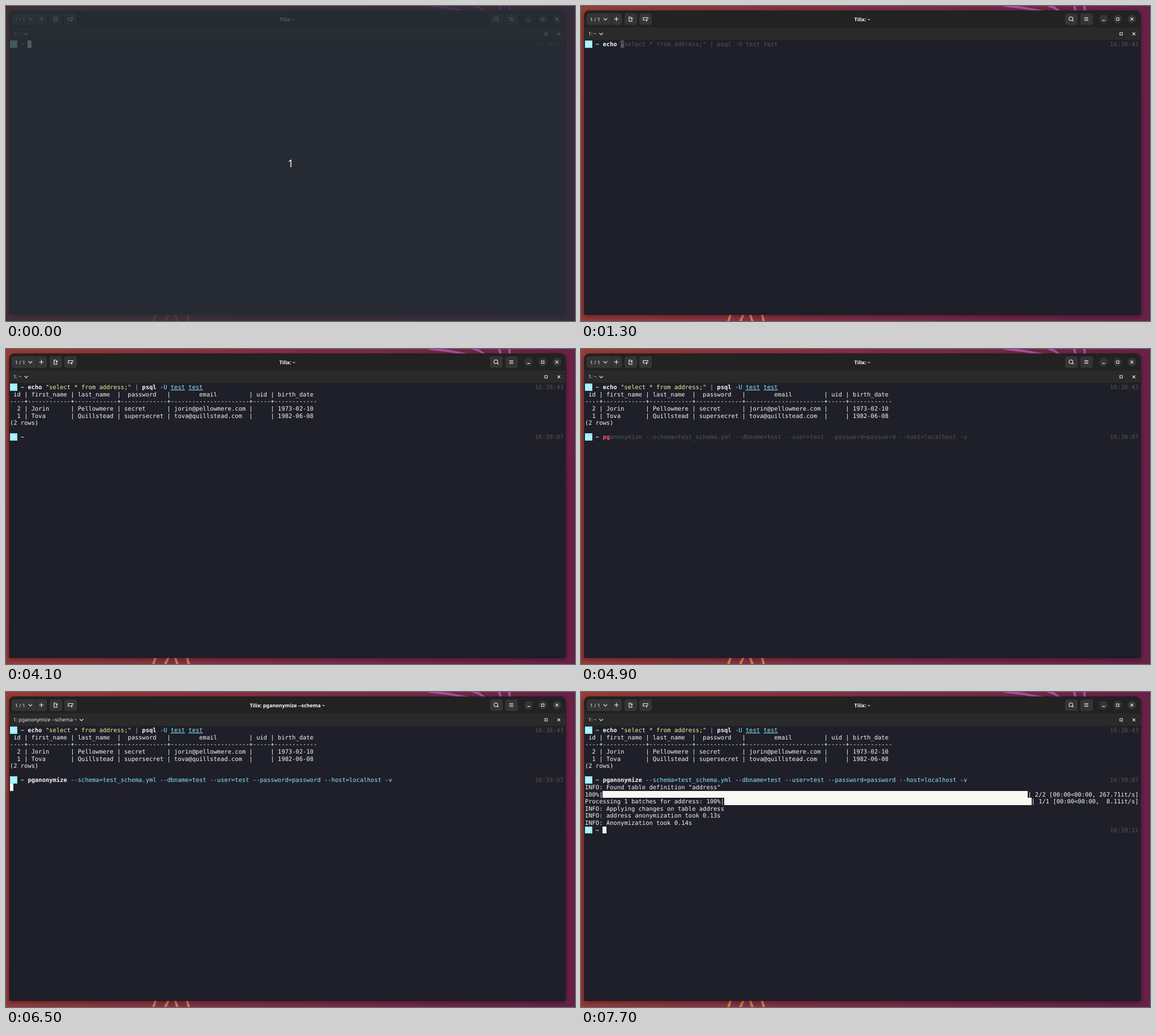
Write an HTML page with a canvas that moves like this. It is 1005x557 px and loops after 8000 ms.

```html
<!DOCTYPE html>
<html lang="en">
<head>
<meta charset="utf-8">
<title>Terminal session</title>
<style>
  html, body { margin: 0; width: 100%; height: 100%; overflow: hidden; background: #7d2c45; }
  canvas { display: block; }
</style>
</head>
<body>
<canvas id="stage" width="1005" height="557"></canvas>
<script>
const ctx = document.getElementById('stage').getContext('2d');
const W = 1005, H = 557, LOOP = 8000;
const CELL_W = 6.309, CELL_H = 12.607, LEFT = 6.9, TOP = 61.1, COLUMNS = 155, PROMPT_WIDTH = 5;
const MONO = '10.48px "DejaVu Sans Mono", monospace';
const SANS = '"Noto Sans", sans-serif';
const BG = '#1e1f29', FG = '#f8f8f2', CYAN = '#8be9fd', ICON = '#f0f0f0', BUTTON = '#353535';

const plain = { color: FG }, bold = { color: FG, bold: true }, option = { color: CYAN };
const path = { color: CYAN, underline: true }, ghost = { color: '#555555' };
const error = { color: '#ff5555', bold: true };

// Progress line filling the terminal width between label and status
const progress = (label, fill, status) =>
  label + fill.repeat(COLUMNS - label.length - status.length) + status;

const sessions = [
  {
    clock: '16:38:43', start: 0, keys: [700, 900, 1000, 1200, 1300], accept: 1600, enter: 2200, done: 2400,
    title: '~',
    command: [
      ['echo ', bold], ['"select * from address;"', { color: '#f1fa8c' }], [' ', plain],
      ['|', { color: '#cf90e6' }], [' psql ', bold], ['-U ', option],
      ['test', path], [' ', plain], ['test', path]
    ],
    output: [{ at: 2300, lines: [
      ' id | first_name | last_name  |  password   |        email         | uid | birth_date',
      [4, 12, 12, 13, 22, 5, 12].map(n => '-'.repeat(n)).join('+'),
      '  2 | Jorin      | Pellowmere | secret      | jorin@pellowmere.com |     | 1973-02-10',
      '  1 | Tova       | Quillstead | supersecret | tova@quillstead.com  |     | 1982-06-08',
      '(2 rows)',
      ''
    ] }]
  },
  {
    clock: '16:39:07', start: 2400, keys: [4200, 4400, 5100], accept: 5200, enter: 6500, done: 7000,
    title: 'pganonymize --schema ~',
    command: [
      ['pganonymize', bold],
      [' --schema=test_schema.yml --dbname=test --user=test --password=password --host=localhost -v', option]
    ],
    output: [
      { at: 6800, lines: [
        'INFO: Found table definition "address"',
        progress('100%|', '█', '| 2/2 [00:00<00:00, 267.71it/s]')
      ] },
      { at: 6800, until: 7000, lines: [progress('  0%|', ' ', '| 0/2 [00:00<?, ?it/s]')] },
      { at: 7000, lines: [
        progress('Processing 1 batches for address: 100%|', '█', '| 1/1 [00:00<00:00,  8.11it/s]'),
        'INFO: Applying changes on table address',
        'INFO: address anonymization took 0.13s',
        'INFO: Anonymization took 0.14s'
      ] }
    ]
  },
  { clock: '16:39:11', start: 7000, keys: [], accept: LOOP, enter: LOOP, command: [], output: [] }
];

// The cursor blinks evenly, starting over after input
const BLINK = 600;
const blinkRestarts = [-300, 700, 1300, 1600, 2200, 2300, 4200, 4300, 5100, 6500];

let cells;

function rect(x, y, w, h, color, radius = 0) {
  ctx.fillStyle = color;
  ctx.beginPath();
  ctx.roundRect(x, y, w, h, radius);
  ctx.fill();
}

function line(color, width, ...points) {
  ctx.strokeStyle = color;
  ctx.lineWidth = width;
  ctx.beginPath();
  points.forEach(([x, y]) => ctx.lineTo(x, y));
  ctx.stroke();
}

function circle(x, y, r) {
  ctx.beginPath();
  ctx.arc(x, y, r, 0, 2 * Math.PI);
}

function label(text, x, y, font, color, align = 'left') {
  ctx.font = font;
  ctx.fillStyle = color;
  ctx.textAlign = align;
  ctx.fillText(text, x, y);
  return ctx.measureText(text).width;
}

const cellX = col => LEFT + col * CELL_W;
const cellY = row => TOP + row * CELL_H;

function block(col, row, width, color) {
  const x = Math.round(cellX(col)), y = Math.round(cellY(row));
  rect(x, y, Math.round(cellX(col + width)) - x, Math.round(cellY(row + 1)) - y, color);
}

function glyph(ch, col, row, style) {
  if (ch === '█') block(col, row, 1, style.color);
  else if (ch !== ' ') label(ch, cellX(col), cellY(row) + 10, (style.bold ? 'bold ' : '') + MONO, style.color);
}

function put(text, col, row, style = plain) {
  [...text].forEach((ch, i) => {
    glyph(ch, col + i, row, style);
    cells[[col + i, row]] = { ...style, ch };
  });
  if (style.underline) rect(cellX(col), cellY(row) + 11, text.length * CELL_W, 1, style.color);
}

function prompt(row, clock) {
  const x = cellX(0), y = cellY(row);
  block(0, row, 2, '#9aedfe');
  for (const dx of [1.5, 6]) line('#f4fdff', 1, [x + dx, y + 3.2], [x + dx + 4.5, y + 6.5], [x + dx, y + 9.8]);
  put('~', 3, row, { color: '#8af5a5', bold: true });
  put(clock, COLUMNS - clock.length, row, ghost);
}

// Typed part is highlighted; the rest shows as a grey suggestion. Returns the cursor column.
function typeCommand({ command, keys, accept }, row, t) {
  const length = command.reduce((sum, [text]) => sum + text.length, 0);
  const typed = t >= accept ? length : keys.filter(key => key <= t).length;
  const known = typed && typed >= command[0][0].trim().length;
  let start = 0;
  for (const [text, style] of typed ? command : []) {
    const split = Math.max(0, Math.min(text.length, typed - start));
    put(text.slice(0, split), PROMPT_WIDTH + start, row, known ? style : error);
    put(text.slice(split), PROMPT_WIDTH + start + split, row, ghost);
    start += text.length;
  }
  return PROMPT_WIDTH + typed;
}

function drawCursor(col, row, t) {
  const restart = blinkRestarts.filter(time => time <= t).pop();
  if (Math.floor((t - restart) / BLINK) % 2) return;
  const cell = cells[[col, row]] || { ...plain, ch: ' ' };
  block(col, row, 1, cell.color);
  glyph(cell.ch, col, row, { ...cell, color: BG });
}

function terminal(t) {
  cells = {};
  let row = 0, col = 0;
  for (const session of sessions.filter(s => t >= s.start)) {
    prompt(row, session.clock);
    col = typeCommand(session, row, t);
    if (t < session.enter) break;
    row++;
    col = 0;
    for (const { at, until = Infinity, lines } of session.output) {
      if (t < at || t >= until) continue;
      lines.forEach((text, i) => put(text, 0, row + i));
      if (until === Infinity) row += lines.length;
    }
  }
  drawCursor(col, row, t);
}

function wallpaper() {
  const gradient = ctx.createLinearGradient(0, 0, W, 180);
  ['#9a3c34', '#8a3241', '#782a49', '#672147'].forEach((c, i) => gradient.addColorStop(i / 3, c));
  rect(0, 0, W, H, gradient);
  const purple = '#b04fa5';
  line(purple, 4, [746, -1], [785, 4], [822, 11]);
  line(purple, 4, [822, -2], [836, 3], [847, 11]);
  line(purple, 4, [871, -1], [874, 11]);
  line(purple, 4, [889, -1], [890, 11]);
  for (const [x, slant] of [[265, -5], [288, -7], [298, 5], [319, 4]])
    line('#dd7c52', 4, [x, 543], [x + slant, 558]);
}

function chevron(x, y) {
  line(ICON, 1.1, [x - 3.2, y - 1.6], [x, y + 1.6], [x + 3.2, y - 1.6]);
}

function plus(x, y, r) {
  line(ICON, 1.1, [x - r, y], [x + r, y]);
  line(ICON, 1.1, [x, y - r], [x, y + r]);
}

function cross(x, y, r) {
  line(ICON, 1.2, [x - r, y - r], [x + r, y + r]);
  line(ICON, 1.2, [x - r, y + r], [x + r, y - r]);
}

function square(x, y) {
  ctx.strokeStyle = ICON;
  ctx.lineWidth = 1;
  ctx.strokeRect(x - 2.2, y - 2.2, 4.4, 4.4);
}

function headerButtons() {
  for (const [x, w] of [[10, 62], [77, 22], [103, 22], [855, 22], [882, 22]]) rect(x, 13, w, 20.5, BUTTON, 4);
  rect(53.5, 13, 1, 20.5, '#242424');
  label('1 / 1', 16, 26.5, '8.8px ' + SANS, ICON);
  chevron(43, 23.3);
  plus(62.5, 23, 3.7);
  line(ICON, 1.2, [88, 19.5], [85, 19.5], [85, 27], [90, 27], [90, 24.5]);
  plus(89.5, 21.8, 2.2);
  line(ICON, 1.2, [113, 25], [110, 25], [110, 20.5], [118, 20.5], [118, 23]);
  plus(115.8, 25, 2.2);

  circle(865.3, 22.5, 3.3);
  ctx.stroke();
  line(ICON, 1.2, [867.7, 24.9], [870, 27.2]);
  for (const y of [20.5, 23, 25.5]) line(ICON, 1, [889, y], [896, y]);

  for (const x of [923, 948, 973]) {
    circle(x, 23.2, 7.6);
    ctx.fillStyle = BUTTON;
    ctx.fill();
  }
  line(ICON, 1.2, [920.7, 25.5], [925.5, 25.5]);
  square(948, 23.2);
  cross(973, 23.2, 2.5);
}

function windowFrame(title) {
  ctx.save();
  ctx.shadowColor = 'rgba(0,0,0,.45)';
  ctx.shadowBlur = 9;
  ctx.shadowOffsetY = 2;
  rect(5.5, 8, 983, 538, '#15151a', [9, 9, 0, 0]);
  ctx.restore();
  rect(6, 8.5, 982, 30, '#222222', [8, 8, 0, 0]);
  rect(6, 38, 982, 22.5, '#2a2a2a');
  rect(6, 60, 982, 485, BG);
  headerButtons();

  label('Tilix: ' + title, 497, 26.5, 'bold 8.9px ' + SANS, '#ffffff', 'center');
  const tabWidth = label('1: ' + title, 13, 52.3, '8.75px ' + SANS, ICON);
  chevron(13 + tabWidth + 8, 49.3);
  square(954, 49.2);
  cross(976.5, 49.2, 2.4);
}

function countdown() {
  rect(0, 0, W, H, 'rgba(40,47,54,.78)');
  label('1', 502.8, 285, '18.5px ' + SANS, '#f4f4f4', 'center');
}

function draw(t) {
  ctx.textRendering = 'geometricPrecision';
  const running = sessions.find(s => t >= s.enter && t < s.done);
  wallpaper();
  windowFrame(running ? running.title : '~');
  terminal(t);
  if (t < 100) countdown();
}

const begin = performance.now();
function frame() {
  draw((performance.now() - begin) % LOOP);
  requestAnimationFrame(frame);
}
frame();
</script>
</body>
</html>
```
